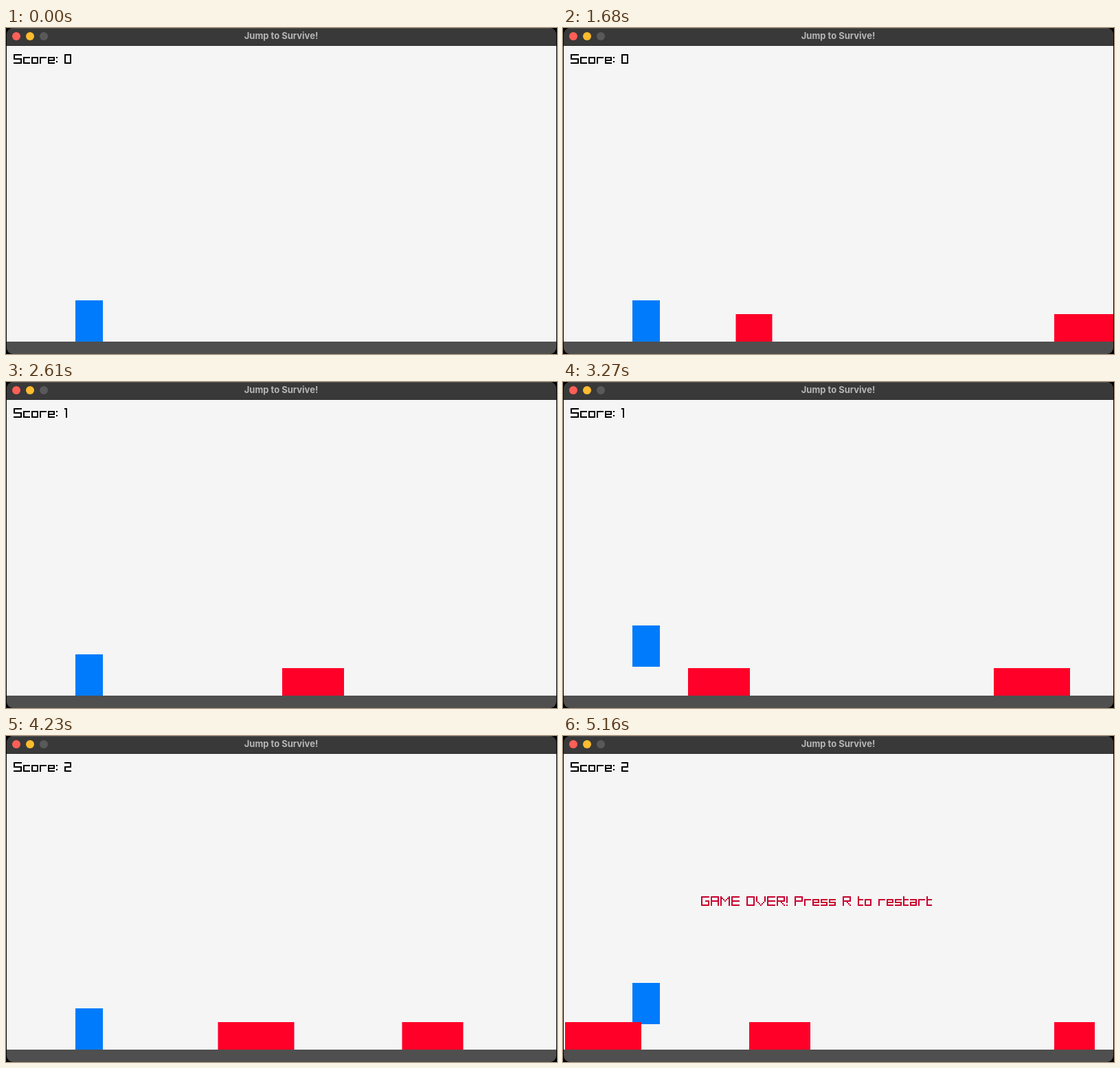
Animation, 802 px wide and 474 px high, one loop 6.06 s. Source, as an HTML page with a canvas:

```html
<!DOCTYPE html>
<html lang="en">
<head>
<meta charset="utf-8">
<title>Jump to Survive!</title>
<style>
  html, body { margin: 0; width: 100%; height: 100%; overflow: hidden; background: #000; }
  canvas { display: block; }
</style>
</head>
<body>
<canvas id="stage" width="802" height="474" aria-label="Jump to Survive! A blue block jumps over red obstacles."></canvas>
<script>
const ctx = document.getElementById('stage').getContext('2d');
const LOOP = 6060, STEP = 30, GAME_OVER = 5160, GROUND = 456;

// Scroll position over time: [ms, x of the first obstacle]
const scrollKeys = [[30, 803], [60, 789], [660, 590], [960, 489], [1290, 384], [1680, 251.5],
  [1920, 171.5], [2610, -61.5], [3840, -471.5], [4620, -729], [5070, -880.5], [5130, -900.5],
  [GAME_OVER, -905.5]];
// [distance behind the first obstacle, width]
const obstacles = [[0, 53], [463.5, 90], [908.5, 111], [1176.5, 89], [1620.5, 59]];
const takeoffs = [241.5, -249, -668.4];

// Pixel letters as strokes; each pair of digits is a grid point (x, y)
const glyphs = {
  S: '500003535606', G: '500006565333', A: '06005056 0353', M: '0600336066',
  E: '50000656 0353', O: '0006565000', V: '0003366360', R: '0600505303 3456',
  P: '0600505303', '!': '0004 0606', ':': '0202 0505', c: '42020646', o: '0206464202',
  r: '060242', e: '460602424404', s: '420204444606', t: '000636 0232', a: '024246060444',
  0: '0006464000', 1: '001016', 2: '004043030646'
};

function rect(color, x, y, w, h) {
  ctx.fillStyle = color;
  ctx.fillRect(x, y, w, h);
}

function dot(color, x) {
  ctx.fillStyle = color;
  ctx.beginPath();
  ctx.arc(x, 12, 6, 0, 7);
  ctx.fill();
}

function pixelText(text, x, y, color) {
  for (const char of text) {
    let width = 3;
    if (glyphs[char]) {
      width = 1;
      for (const stroke of glyphs[char].split(' ')) {
        const points = stroke.match(/../g).map(p => [+p[0], +p[1]]);
        for (let i = 1; i < points.length; i++) {
          const [ax, ay] = points[i - 1], [bx, by] = points[i];
          const n = Math.max(Math.abs(bx - ax), Math.abs(by - ay), 1);
          for (let k = 0; k <= n; k++) {
            const px = Math.round(ax + (bx - ax) * k / n);
            const py = Math.round(ay + (by - ay) * k / n);
            rect(color, x + 2 * px, y + 2 * py, 2, 2);
          }
          width = Math.max(width, ax + 1, bx + 1);
        }
      }
    }
    x += 2 * width + 2;
  }
}

function scrollAt(t) {
  const i = scrollKeys.findIndex(key => key[0] > t);
  if (i === 0) return scrollKeys[0][1];
  if (i < 0) return scrollKeys.at(-1)[1];
  const [t0, x0] = scrollKeys[i - 1], [t1, x1] = scrollKeys[i];
  return x0 + (x1 - x0) * (t - t0) / (t1 - t0);
}

// Speed 450 px/s up, gravity 1000 px/s², stepped at 60 Hz while the world moves 5 px per tick
function jumpHeight(scroll) {
  return Math.max(0, ...takeoffs.map(start => {
    const n = (start - scroll) / 5;
    return 7.5 * n - n * (n + 1) / 7.2;
  }));
}

const half = v => Math.round(v * 2) / 2;

function draw(t) {
  const scroll = scrollAt(t);
  rect('#000', 0, 0, 802, 474);
  ctx.save();
  ctx.beginPath();
  ctx.roundRect(1, 0, 800, 474, 9);
  ctx.clip();

  rect('#f5f5f5', 0, 26, 802, 430);
  rect('#4f4f4f', 0, GROUND, 802, 18);
  rect('#007bfb', 101, half(396 - jumpHeight(scroll)), 40, 60);
  let score = 0;
  for (const [offset, width] of obstacles) {
    const x = scroll + offset;
    rect('#fe0028', half(x), 416, width, 40);
    if (x + width < 1) score++;
  }
  pixelText('Score: ' + score, 11, 38, '#000');
  if (t >= GAME_OVER) pixelText('GAME OVER! Press R to restart', 201, 233, '#c8002f');

  rect('#393939', 0, 0, 802, 26);
  rect('#505050', 0, 0, 802, 1);
  rect('#2c2c2c', 0, 25, 802, 1);
  dot('#ff5f57', 15);
  dot('#febc2e', 35);
  dot('#595959', 55);
  ctx.fillStyle = '#b6b6b6';
  ctx.font = '700 13px Inter, sans-serif';
  ctx.textAlign = 'center';
  ctx.fillText('Jump to Survive!', 400.5, 16);
  ctx.restore();
}

function tick() {
  const t = performance.now() % LOOP;
  draw(Math.floor(t / STEP) * STEP);
  requestAnimationFrame(tick);
}
tick();
</script>
</body>
</html>
```
